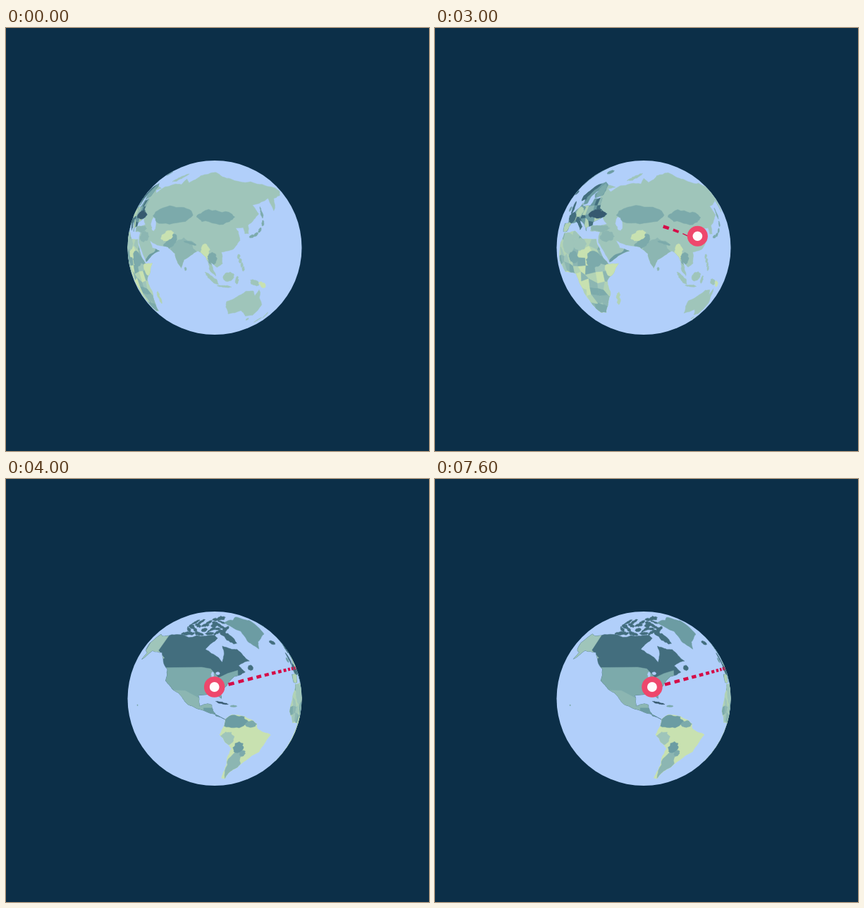
Animation of 600x600 px, one loop 7700 ms. Source, as an HTML page with a canvas:

```html
<!DOCTYPE html>
<html lang="en">
<head>
<meta charset="utf-8">
<title>Globe route</title>
<style>
html, body { margin: 0; width: 100%; height: 100%; overflow: hidden; background: #0c2f48; }
canvas { display: block; width: 100vw; height: 100vh; }
</style>
</head>
<body>
<canvas id="stage" width="600" height="600"></canvas>
<script>
const ctx = document.getElementById('stage').getContext('2d');
const LOOP = 7700, STEP = 100;
const CX = 296, CY = 311.5, R = 123.5, CAM = 12;
const RAD = Math.PI / 180, LON_SCALE = 0.83;
const SEA = '#b1cffa';
const TONES = ['#36596f', '#436e7e', '#6c9ca3', '#7caaab', '#8cb6b2', '#9fc5ba', '#b1d2b5', '#c8e1b0'];

let seed = 11;
function rand() {
  seed = (seed * 16807) % 2147483647;
  return seed / 2147483647;
}
const pick = list => list[Math.floor(rand() * list.length)];

// ---- Land: key points become coasts by midpoint displacement ----

function pairs(flat) {
  const pts = [];
  for (let i = 0; i < flat.length; i += 2) pts.push([flat[i], flat[i + 1]]);
  return pts;
}

function roughen(pts, depth = 3, amount = 0.2) {
  if (!depth) return pts;
  const out = [];
  pts.forEach(([x, y], i) => {
    const [nx, ny] = pts[(i + 1) % pts.length];
    const push = (rand() - 0.5) * amount;
    out.push([x, y], [(x + nx) / 2 - (ny - y) * push, (y + ny) / 2 + (nx - x) * push * 0.5]);
  });
  return roughen(out, depth - 1, amount);
}

// Miller latitude as an angle on the ball
function ballLat(lat) {
  const miller = 1.25 * Math.log(Math.tan(Math.PI / 4 + 0.4 * lat * RAD));
  return (-18.8 + 0.75 * miller / RAD) * RAD;
}

function shape(color, pts) {
  const ball = pts.map(([lon, lat]) => {
    const dip = lon < -50 ? 2.2 * Math.exp(-(((lat - 42) / 16) ** 2)) : 0;
    return [lon * LON_SCALE, ballLat(lat - dip)];
  });
  const turns = ball.map(p => p[0]);
  return { color, ball, mid: (Math.min(...turns) + Math.max(...turns)) / 2, parts: [] };
}

const area = (tone, flat) => shape(TONES[tone], pairs(flat));

function blob(color, lon, lat, w, h, tilt = 0) {
  const pts = [], c = Math.cos(tilt), s = Math.sin(tilt);
  for (let i = 0; i < 8; i++) {
    const a = i * Math.PI / 4;
    const x = w * Math.cos(a), y = h * Math.sin(a);
    pts.push([lon + x * c - y * s, lat + x * s + y * c]);
  }
  return shape(color, roughen(pts, 2, 0.5));
}

const patch = (tone, ...place) => blob(TONES[tone], ...place);
const water = (...place) => blob(SEA, ...place);

// Jittered grid of countries
function mosaic(west, south, cols, rows, size, tones) {
  const jitter = () => (rand() - 0.5) * size * 0.7;
  const corner = [];
  for (let j = 0; j <= rows; j++) {
    corner.push([]);
    for (let i = 0; i <= cols; i++) corner[j].push([west + i * size + jitter(), south + j * size + jitter()]);
  }
  const cells = [];
  for (let j = 0; j < rows; j++) {
    for (let i = 0; i < cols; i++) {
      cells.push(shape(TONES[pick(tones)], [corner[j][i], corner[j][i + 1], corner[j + 1][i + 1], corner[j + 1][i]]));
    }
  }
  return cells;
}

const lands = [];
function continent(tone, flat, ...parts) {
  const land = shape(TONES[tone], roughen(pairs(flat)));
  land.parts = parts.flat();
  lands.push(land);
}
const isle = (...place) => lands.push(patch(...place));

// Asia
continent(5, [30,69, 41,67, 33,66.5, 38,64, 46,68, 67,69, 70,73, 75,70, 86,75, 104,77.5, 113,74, 130,71, 160,69.7, 190,66,
  179,62.5, 164,60, 157,51.5, 156,60, 136,55, 140,49, 129,41, 129,35, 126,35, 125,39.5, 119,39, 121,36.5, 122,30, 117,23.5,
  108,21, 109,12, 105,9, 100,13, 104,1.5, 99,8, 97,16.5, 91,22, 80,15, 77.5,8, 73,20, 67,25, 57,26.5, 49,30, 52,24.5,
  59.5,22, 44,13, 35,28.5, 36,36.5, 27,37, 27,41, 41,42, 37,46, 30,53, 28,58],
  patch(3, 67, 48, 19, 6.2), patch(3, 104, 46.7, 15, 4.6), patch(4, 80, 20, 11, 12),
  patch(3, 69, 29, 7, 4, 0.8), patch(7, 66, 33.5, 6, 3.5, 0.4), patch(7, 96, 20.5, 3, 7),
  patch(3, 101.5, 16, 3.5, 5), patch(3, 85, 28, 5, 1, -0.3), patch(2, 51, 17, 11, 3, 0.7),
  patch(4, 35, 39, 9, 2.5), patch(4, 42, 33, 6, 4), water(51, 42, 2.4, 5, 0.3));
// Africa
continent(6, [-6,35.8, 10,37.3, 20,31, 33,31, 37,21, 43,11.5, 51,12, 40,-3, 40.5,-15, 35,-24, 27,-34, 19,-34.5, 12,-17,
  9,3, -8,4.4, -17,14, -13,27],
  mosaic(-20, -38, 11, 11, 7, [3, 4, 5, 6, 6, 7, 7]), patch(5, 2, 28, 9, 8), patch(5, 17, 27, 7, 5),
  patch(3, 30, 15, 7, 7), patch(3, 9, 17, 6, 5), patch(3, 24, -30, 9, 6), patch(7, 46, 6, 6, 7, 0.7));
// Europe
continent(2, [-9,37, -9,43, -2,43.5, -4,48.5, 8,54, 10,57, 12,54.5, 21,55, 23,59.5, 31,60, 32,53, 40,49, 38,47, 34,45.5,
  28.5,43.5, 28,41, 23,40, 23,37, 19.5,42, 13,45.5, 18,40.3, 16,38, 10,44, 3,43, -2,37],
  mosaic(-10, 35, 9, 6, 5, [1, 2, 2, 4, 6]), patch(6, -4, 40, 5, 4), patch(1, 2, 47, 5, 4),
  patch(6, 10.5, 51, 4.5, 3.5), patch(0, 31, 49, 9, 3), patch(1, 13, 42, 7, 3, -0.9));
continent(2, [6,58.5, 5,62, 15,68.5, 26,71, 31,69, 31,62, 23,60, 21,63, 25,65.5, 21,64.5, 17,61, 16,56.5, 12,56, 11,59.5],
  patch(3, 27, 64, 4, 6), patch(1, 12, 65, 13, 3, 0.6), patch(1, 8, 60, 4, 3));
isle(1, -2.5, 54, 1.8, 4.6, 0.2);
isle(2, -8, 53.3, 1.9, 1.8);
isle(1, -19, 65, 5, 1.4);
isle(2, 18, 78.5, 6, 1.4);
isle(5, 60, 74, 9, 1, 0.3);
// Far East and Oceania
for (let i = 0; i < 4; i++) isle(3, 131.5 + 3.6 * i, 33 + 0.9 * i * i + i * 0.5, 2.2, 1, 0.3 + i * 0.3);
for (let i = 0; i < 4; i++) isle(5, 121 + 1.4 * i, 17.5 - 3.3 * i, 1, 2);
isle(3, 143, 50, 0.8, 4);
isle(4, 80.8, 7.6, 0.9, 1.5);
isle(5, 101, -0.5, 7.5, 1.5, -0.8);
isle(5, 111, -7.5, 6, 0.8, -0.1);
isle(5, 114, 1, 4.5, 4, 0.6);
isle(5, 121, -2, 1.3, 3.5);
isle(5, 136.5, -4.5, 5, 2.2, -0.5);
isle(7, 144.5, -6.5, 4.5, 2, -0.6);
continent(5, [114,-22, 122,-18, 130,-12, 137,-12, 140,-17, 142.5,-11, 146,-19, 153,-26, 150,-37.5, 140,-38, 131,-31.5,
  118,-35, 114,-27]);
isle(5, 146.5, -42, 1.7, 1.4);
isle(5, 176, -38.5, 1.3, 3.5, 0.3);
isle(5, 170, -44, 1.3, 4, -0.8);
isle(6, 47, -19, 1.9, 6.5, -0.25);
// North America
continent(1, [-168,65.5, -157,71, -128,70, -95,68.5, -85,69, -82,67, -93,60, -82,55, -79,52, -77,57, -78,62, -70,60, -65,60,
  -56,53, -66,50, -61,46, -70,43, -76,36, -81,31, -80,25.5, -84,30, -97,28, -96,19, -90,21, -87,20, -84,11, -77,8,
  -92,15, -105,20.5, -112,30, -117,33, -124,40, -124,48, -135,58.5, -150,60, -163,55, -158,59, -165,61],
  area(3, [-130,49, -95,49, -88,48, -82,42, -75,45, -67,47, -67,20, -130,20]),
  area(4, [-120,32.5, -107,32, -97,26, -85,24, -85,5, -120,10]),
  area(2, [-93,17.5, -80,17.5, -75,5, -93,5]),
  area(5, [-141,75, -141,60, -130,55, -170,50, -175,70]),
  water(-86.5, 44, 1, 2), water(-82.5, 45, 1.5, 1));
for (let i = 0; i < 22; i++) {
  const row = i % 4;
  isle(1, -120 + 2.2 * i + 4 * rand(), 70 + row * 2.6 + rand(), 3 + 3 * rand(), 0.7 + 0.6 * rand(), rand() - 0.5);
}
isle(1, -72, 68, 9, 2.6, -0.5);
isle(1, -77, 81.5, 12, 1.4, 0.1);
isle(1, -56, 48.7, 2.4, 1.7);
isle(0, -79.5, 21.8, 4.8, 0.7, -0.25);
isle(3, -71, 19, 2.6, 0.8);
isle(3, -155.5, 19.6, 0.7, 0.6);
continent(2, [-72,78, -40,83.3, -18,81, -22,71, -40,65, -43,60, -52,65, -55,72]);
// South America
continent(7, [-77,8, -72,12, -62,10.5, -51,4, -50,0, -35,-6, -39,-15, -41,-22, -48,-26, -58,-38, -65,-43, -68,-53, -74,-52,
  -73,-38, -70,-18, -81,-5],
  patch(5, -75, -9, 6, 7, -0.5), patch(2, -70, 6.5, 11, 5.5), patch(3, -56, 4, 5, 3),
  patch(4, -64, -36, 7, 18, -0.15), patch(2, -64, -17, 5, 5.5), patch(3, -58.5, -23, 3, 3));

// ---- Drawing ----

const clamp = (v, a = 0, b = 1) => Math.min(b, Math.max(a, v));
const easeInOut = u => u < 0.5 ? 2 * u * u : 1 - 2 * (1 - u) ** 2;
const span = (t, from, to) => clamp((t - from) / (to - from));
const wrap = a => ((a + 180) % 360 + 360) % 360 - 180;

// theta in degrees, phi in radians, h is the height above the centre
function project(theta, phi, h = 1) {
  const a = theta * RAD, c = Math.cos(phi);
  const z = h * c * Math.cos(a);
  const k = Math.sqrt(CAM * CAM - 1) / (CAM - z);
  return { x: CX + R * h * c * Math.sin(a) * k, y: CY - R * h * Math.sin(phi) * k, z, k };
}

function disc(x, y, r, color) {
  ctx.fillStyle = color;
  ctx.beginPath();
  ctx.arc(x, y, r, 0, 2 * Math.PI);
  ctx.fill();
}

function drawLand({ color, ball, mid, parts }, turn) {
  const shift = wrap(mid - turn) - mid;
  let seen = false;
  ctx.beginPath();
  for (const [a, phi] of ball) {
    const rim = Math.acos(Math.min(1, 1 / (CAM * Math.cos(phi)))) / RAD;
    const theta = a + shift;
    if (Math.abs(theta) < rim) seen = true;
    const p = project(clamp(theta, -rim, rim), phi);
    ctx.lineTo(p.x, p.y);
  }
  if (!seen) return;
  ctx.closePath();
  ctx.fillStyle = ctx.strokeStyle = color;
  ctx.fill();
  ctx.stroke();
  if (!parts.length) return;
  ctx.save();
  ctx.clip();
  for (const part of parts) drawLand(part, turn);
  ctx.restore();
}

const START = 88.7, END = -70.6, PIN_LAT = 6.2;

function routePoint(a, turn) {
  const s = (2 * a - START - END) / (START - END);
  const lat = PIN_LAT + (1 - s * s) * (14.2 + 3 * s);
  return project(a - turn, lat * RAD);
}

function drawRoute(amount, turn) {
  const tip = START + (END - START) * amount;
  ctx.strokeStyle = '#d50c48';
  for (let a = START - 2.2; a > tip; a -= 6.3) {
    const p = routePoint(a, turn), q = routePoint(Math.max(a - 3.6, tip), turn);
    if (p.z < 1 / CAM && q.z < 1 / CAM) continue;
    ctx.lineWidth = 4.6 * clamp(Math.min(START - a, a - END) / 11, 0.3, 1);
    ctx.beginPath();
    ctx.moveTo(p.x, p.y);
    ctx.lineTo(q.x, q.y);
    ctx.stroke();
  }
}

function drawPin({ p, size }) {
  disc(p.x, p.y, 13.4 * p.k * size, '#ee476c');
  disc(p.x, p.y, 6.3 * p.k * size, '#fffafc');
}

function draw(t) {
  const lon = 103.2 - 193.7 * easeInOut(span(t, 2500, 4205));
  const turn = lon * LON_SCALE;
  const pin = (a, size) => ({ p: project(a - turn, PIN_LAT * RAD, 1.125), size });
  const pins = [pin(START, 1 - (1 - span(t, 950, 1400)) ** 3), pin(END, t >= 2600 ? 1 : 0)];

  ctx.fillStyle = '#0c2f48';
  ctx.fillRect(0, 0, 600, 600);
  pins.filter(m => m.p.z < 0).forEach(drawPin);
  disc(CX, CY, R, SEA);
  ctx.save();
  ctx.beginPath();
  ctx.arc(CX, CY, R, 0, 2 * Math.PI);
  ctx.clip();
  ctx.lineWidth = 0.5;
  ctx.lineJoin = 'round';
  for (const land of lands) drawLand(land, turn);
  drawRoute(easeInOut(span(t, 2777, 3660)), turn);
  ctx.restore();
  pins.filter(m => m.p.z >= 0).forEach(drawPin);
}

const begin = performance.now();
function tick() {
  const t = (performance.now() - begin) % LOOP;
  draw(Math.floor(t / STEP) * STEP);
  requestAnimationFrame(tick);
}
tick();
</script>
</body>
</html>
```
